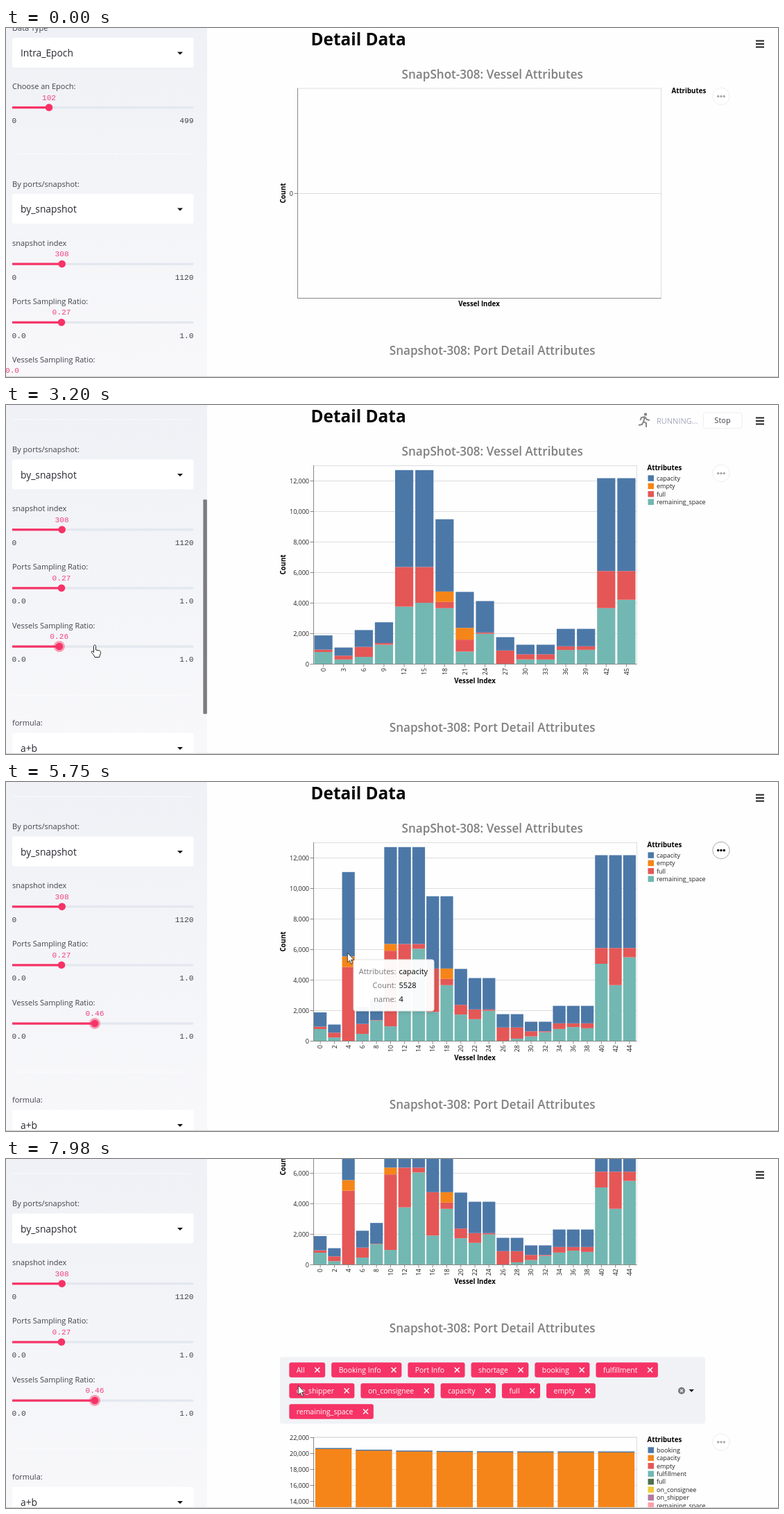
An HTML page for the animation above (8 s loop, 1113 by 503 pixels).

```html
<!DOCTYPE html>
<html lang="en">
<head>
<meta charset="utf-8">
<title>Detail Data</title>
<style>
html, body { margin: 0; width: 100%; height: 100%; overflow: hidden; background: #fff; }
svg { display: block; width: 100%; height: 100%; }
text { font-family: "Open Sans", "Noto Sans", sans-serif; font-size: 11px; fill: #41424b; white-space: pre; }
.mono { font-family: "Liberation Mono", "Noto Sans Mono", monospace; font-size: 11.2px; }
.val { fill: #f0447a; }
.pick { font-size: 13.8px; fill: #262730; }
.h1 { font-size: 24.4px; font-weight: 700; fill: #050505; }
.h2 { font-size: 17.1px; font-weight: 600; fill: #808080; }
.ax { font-size: 9px; fill: #222; }
.axt { font-size: 9.7px; font-weight: 700; fill: #000; }
.tag { font-size: 10.4px; fill: #fff; }
.key { fill: #777; }
.fact { fill: #000; }
.soft { fill: #a3a8b8; }
</style>
</head>
<body>
<svg id="stage" viewBox="0 0 1113 503" xmlns="http://www.w3.org/2000/svg"></svg>
<script>
const PINK = '#f63366', BLUE = '#4c78a8', ORANGE = '#f58518', RED = '#e45756', TEAL = '#72b7b2';
const LOOP = 8000, PLOT = 443, SPAN = 466;

// ship classes: first vessel index -> capacity
const classes = {
  0: 930, 2: 533, 4: 5528, 6: 1105, 8: 1360, 10: 6345, 16: 4735,
  20: 2355, 22: 2055, 26: 873, 30: 625, 34: 1145, 40: 6080
};
// percent of free space, one per sampled vessel; percent of empty containers where there are any
const free = [83, 41, 53, 0, 41, 98, 92, 15, 59, 95, 63, 40, 77, 73, 34, 69, 96, 0, 0, 16, 46, 90, 45,
  68, 79, 72, 80, 83, 60, 90, 69];
const empties = { 4: 12.6, 10: 7, 18: 14.4, 21: 32.7 };

const capacityOf = k => classes[Math.max(...Object.keys(classes).filter(c => c <= k))];
const vessels = [...Array(46).keys()].filter(k => k % 2 === 0 || k % 3 === 0).map((k, i) => {
  const cap = capacityOf(k), rem = cap * free[i] / 100, empty = cap * (empties[k] || 0) / 100;
  return { k, cap, rem, empty, full: cap - rem - empty };
});

const text = (x, y, s, cls = '', anchor = 'start', extra = '') =>
  `<text x="${x}" y="${y}" class="${cls}" text-anchor="${anchor}" ${extra}>${s}</text>`;
const rect = (x, y, w, h, fill, extra = '') =>
  `<rect x="${x}" y="${y}" width="${w}" height="${h}" fill="${fill}" ${extra}/>`;
const path = (d, stroke, extra = 'fill="none"') => `<path d="${d}" stroke="${stroke}" ${extra}/>`;
const group = (id, body, extra = '') => `<g id="${id}" ${extra}>${body}</g>`;
const vertical = (x, y, s, cls, anchor) => text(x, y, s, cls, anchor, `transform="rotate(-90 ${x} ${y})"`);
const thousands = (from, to) => Array.from({ length: (to - from) / 2 + 1 }, (_, i) => (from + i * 2) * 1000);

const pen = document.createElement('canvas').getContext('2d');
pen.font = '10.4px "Open Sans", "Noto Sans", sans-serif';

function select(y, label, value) {
  return text(9, y - 10.3, label) + rect(9, y, 261.5, 43, '#fff', 'rx="3"') +
    text(21, y + 27, value, 'pick') + `<path d="M247 ${y + 20.5}h8l-4 4z" fill="#111"/>`;
}

function slider(y, label, value, x, min, max, id = '') {
  return text(9, y - 26.3, label) +
    text(x, y - 11, value, 'mono val', 'middle', id && `id="${id}Text"`) +
    rect(9, y - 1.5, 261.5, 3.2, '#e3e7ef', 'rx="1.5"') +
    rect(9, y - 1.5, x - 9, 3.2, PINK, id && `id="${id}Fill"`) +
    (id && `<circle id="${id}Halo" cx="${x}" cy="${y}" r="8" fill="${PINK}" opacity=".45"/>`) +
    `<circle cx="${x}" cy="${y}" r="5.3" fill="${PINK}" ${id && `id="${id}Thumb"`}/>` +
    text(8.5, y + 22.5, min, 'mono') + text(270.5, y + 22.5, max, 'mono', 'end');
}

function legend(x, y, items) {
  return text(x, y, 'Attributes', 'axt') + items.map(([name, color], i) => {
    const cy = y + 11.5 + i * 11.4;
    return rect(x + 1, cy - 4.2, 8.5, 8.5, color) + text(x + 13.5, cy + 3.2, name, 'ax');
  }).join('');
}

function frame(x, y, w, h, ticks, yOf) {
  return rect(x + .5, y + .5, w, h, 'none', 'stroke="#ddd"') + ticks.map(v => {
    const ty = Math.round(yOf(v)) + .5;
    return path(`M${x} ${ty}h${w}`, '#ddd') + path(`M${x - 4.5} ${ty}h4.5`, '#888') +
      text(x - 6, ty + 3.2, v.toLocaleString('en-US'), 'ax', 'end');
  }).join('');
}

const axes = (x, y, w, h) => path(`M${x + .5} ${y}v${h + .5}h${w}`, '#888');

const axisTitles = (x, y) => vertical(402.7, y, 'Count', 'axt', 'middle') +
  text(x, 400.5, 'Vessel Index', 'axt', 'middle');

function vesselChart(id, step) {
  const yOf = v => 373 - v * .022, shown = vessels.filter(v => v.k % step === 0);
  const band = SPAN / shown.length;
  let s = frame(PLOT, 87, SPAN, 286, thousands(0, 12), yOf);
  shown.forEach(({ k, cap, rem, empty, full }, i) => {
    let sum = 0;
    [[rem, TEAL], [full, RED], [empty, ORANGE], [cap, BLUE]].forEach(([n, color]) => {
      sum += n;
      s += rect(PLOT + band * (i + .05), yOf(sum), band * .9, n * .022, color);
    });
    const cx = PLOT + band * (i + .5);
    s += path(`M${cx} 373v4.5`, '#888') + vertical(cx + 3.2, 379, k, 'ax', 'end');
  });
  return group(id, s + axes(PLOT, 87, SPAN, 286) + axisTitles(676, 230) +
    legend(924.5, 94, [['capacity', BLUE], ['empty', ORANGE], ['full', RED], ['remaining_space', TEAL]]));
}

function emptyChart() {
  return group('chart0', frame(420, 86.5, 524, 302.5, [0], () => 238) + axes(420, 87, 524, 302) +
    axisTitles(682, 238) + text(959.5, 94, 'Attributes', 'axt'));
}

function portChart() {
  const top = 622, count = 8, band = SPAN / count;
  let s = frame(PLOT, top - .5, SPAN, 260, thousands(14, 22), v => top + (22000 - v) * .01155);
  for (let i = 0; i < count; i++) {
    const x = PLOT + band * (i + .05), y = top + 22 - 5 * Math.exp(-i / 1.5);
    s += rect(x, y - 1.5, band * .9, 2, BLUE) + rect(x, y, band * .9, 200, ORANGE);
  }
  return s + path(`M${PLOT + .5} ${top}v260`, '#888') + legend(924.5, 629, [
    ['booking', BLUE], ['capacity', ORANGE], ['empty', RED], ['fulfillment', TEAL], ['full', '#4f7050'],
    ['on_consignee', '#eeca3b'], ['on_shipper', '#b279a2'], ['remaining_space', '#ff9da6']]);
}

function tags() {
  const names = ['All', 'Booking Info', 'Port Info', 'shortage', 'booking', 'fulfillment', 'on_shipper',
    'on_consignee', 'capacity', 'full', 'empty', 'remaining_space'];
  let s = rect(395, 506.5, 613, 96, '#f0f2f6', 'rx="3"'), x = 408.3, y = 525;
  for (const name of names) {
    const w = pen.measureText(name).width + 40;
    if (x + w > 960) { x = 408.3; y += 30; }
    s += rect(x, y - 10.8, w, 21.6, PINK, 'rx="3"') + text(x + 10.5, y + 3.6, name, 'tag') +
      path(`M${x + w - 14.8} ${y - 3.5}l7 7m0-7l-7 7`, '#fff', 'stroke-width="1.5"');
    x += w + 9;
  }
  return s + '<circle cx="974" cy="555" r="5" fill="#777"/>' +
    path('M972 553l4 4m0-4l-4 4', '#f0f2f6', 'stroke-width="1.2"') +
    '<path d="M984.5 553h7.5l-3.7 4z" fill="#222"/>';
}

const menuDots = (id, y) => group(id,
  `<circle cx="1031" cy="${y}" r="12.2" fill="#fff" stroke="#eee"/>` +
  [-4.3, 0, 4.3].map(d => `<circle cx="${1031 + d}" cy="${y}" r="1.7"/>`).join(''), 'fill="#aaa"');

const runner = group('runner', '<circle cx="922" cy="13.5" r="2.2" fill="#888" stroke="none"/>' +
  path('M921 17l-2 7l4 2v6M919 24l-2 4l-5 1M921 17l-5 1l-1.5 4M921 17l3 4l4 1', '#888'),
  'fill="none" stroke-width="2"');
const bike = group('bike', '<circle cx="914" cy="26" r="4.4"/><circle cx="927" cy="26" r="4.4"/>' +
  '<circle cx="922.5" cy="13.5" r="1.9" fill="#888"/>' + path('M921 27v-4l-4-3l5-4l3 4h4', '#888'),
  'fill="none" stroke="#888" stroke-width="1.6"');
const rule = y => rect(9, y, 257, 1, '#fff', 'opacity=".55"');

const stage = document.getElementById('stage');
stage.innerHTML = `
<defs>
  <linearGradient id="shade" x2="0" y2="1"><stop stop-color="#eff1f6"/><stop offset="1" stop-color="#f8f8fa"/></linearGradient>
  <clipPath id="sideClip"><rect width="290" height="503"/></clipPath>
  <filter id="drop" x="-10%" y="-10%" width="125%" height="130%"><feDropShadow dx="2" dy="2" stdDeviation="2" flood-opacity=".12"/></filter>
</defs>` +
  rect(0, 0, 1113, 503, '#fefefe') +
  group('main',
    text(439.5, 24.5, 'Detail Data', 'h1') +
    text(701.2, 72.5, 'SnapShot-308: Vessel Attributes', 'h2', 'middle') +
    emptyChart() + vesselChart('chart1', 3) + vesselChart('chart2', 2) + menuDots('dots', 98.5) +
    text(701.2, 471, 'Snapshot-308: Port Detail Attributes', 'h2', 'middle') +
    tags() + portChart() + menuDots('dots2', 629)) +
  group('running', runner + bike + text(938, 27, 'RUNNING...', 'soft') +
    rect(1005.5, 11, 55.5, 22.5, '#fff', 'rx="3" stroke="#eee"') +
    text(1033, 26.3, 'Stop', '', 'middle')) +
  path('M1081 18.5h12M1081 23h12M1081 27.5h12', '#222', 'stroke-width="1.8"') +
  '<g clip-path="url(#sideClip)">' + rect(0, 0, 290, 503, 'url(#shade)') +
  group('side',
    select(14, 'Data Type', 'Intra_Epoch') +
    slider(114.5, 'Choose an Epoch:', '102', 62, '0', '499') + rule(181) +
    select(239, 'By ports/snapshot:', 'by_snapshot') +
    slider(340, 'snapshot index', '308', 80.7, '0', '1120') +
    slider(424.2, 'Ports Sampling Ratio:', '0.27', 80, '0.0', '1.0') +
    slider(508.4, 'Vessels Sampling Ratio:', '0.0', 9, '0.0', '1.0', 'ratio') + rule(578) +
    select(633, 'formula:', 'a+b')) +
  rect(284.3, 43, 5.5, 309, '#7c7c7e', 'id="bar" rx="1"') + '</g>' +
  rect(0, 501.8, 1113, 1.2, '#d2d2d4') +
  group('tip', rect(0, 0, 116, 74, '#fff', 'id="tipBox" rx="3" fill-opacity=".95" stroke="#e4e4e4" filter="url(#drop)"') +
    ['Attributes:', 'Count:', 'name:'].map((k, i) =>
      text(61.5, 21 + i * 20, k, 'key', 'end') +
      text(65.5, 21 + i * 20, '4', 'fact', 'start', `id="tip${i}"`)).join('')) +
  group('arrow', path('M.3 .3V14L3.4 11.2L5.6 16.2L7.7 15.3L5.5 10.4H9.8Z', '#333', 'fill="#fff" stroke-width=".9"')) +
  group('hand', path('M-1.5 1.5c0-2 3-2 3 0V7l5 1c1.5.3 2 1 2 2.5 0 3-1.5 4-1.8 7H0C-.5 15-3.5 12-4.7 10.5c-.8-1.2.6-2.2 1.8-1.2l1.4 1.2Z',
    '#222', 'fill="#fff" stroke-width="1"'));

const $ = id => document.getElementById(id);
const show = (id, on) => { $(id).style.display = on ? '' : 'none'; };
const move = (id, x, y) => $(id).setAttribute('transform', `translate(${x} ${y})`);
const during = (t, a, b) => t >= a && t < b;

// each move: start, end, then the values reached; eases out and rests in between
function glide(values, moves, t) {
  for (const [a, b, ...goal] of moves) {
    if (t <= a) break;
    const p = 1 - (1 - Math.min(1, (t - a) / (b - a))) ** 2;
    values = values.map((v, i) => v + (goal[i] - v) * p);
  }
  return values;
}

const pointer = t => glide([564, 427], [
  [130, 620, 25, 405], [1640, 2100, 77, 349], [3100, 3200, 128, 346], [3700, 4290, 462, 286],
  [4480, 4830, 497, 285], [5000, 5120, 497, 241], [5290, 5520, 492, 246], [5830, 6060, 488, 213],
  [6600, 6830, 471, 223], [6980, 7750, 421, 326]], t);
const sideScroll = t => glide([0], [[770, 1250, 79], [1410, 1720, 160.4]], t)[0];
const mainScroll = t => glide([0], [[7750, 7960, 221]], t)[0];

function setRatio(t) {
  const [label, x] = t < 2330 ? ['0.0', 9] : t < 3590 ? ['0.26', 76.8] : ['0.46', 128];
  $('ratioText').textContent = label;
  $('ratioText').setAttribute('x', x);
  $('ratioFill').setAttribute('width', x - 9);
  $('ratioThumb').setAttribute('cx', x);
  $('ratioHalo').setAttribute('cx', x);
  show('ratioHalo', t >= 2330);
}

// the only bar the pointer visits is vessel 4
function setTip(x, y, t) {
  const on = during(t, 4480, 7000) && x > 484.5 && x < 502.7;
  show('tip', on);
  if (!on) return;
  const [name, n, w] = y < 251.4 ? ['capacity', 5528, 116] : y < 266.7 ? ['empty', 696, 108] : ['full', 4832, 100];
  move('tip', x + 9, y + 10);
  $('tipBox').setAttribute('width', w);
  $('tip0').textContent = name;
  $('tip1').textContent = n;
}

function draw(t) {
  const [x, y] = pointer(t), side = sideScroll(t), main = mainScroll(t);
  const visible = t >= 130, hand = during(t, 2050, 3780);
  move('side', 0, -side);
  move('main', 0, -main);
  $('bar').setAttribute('y', 43 + side * .581);
  show('bar', visible && x < 290);
  setRatio(t);
  show('chart0', t < 3200);
  show('chart1', during(t, 3200, 4210));
  show('chart2', t >= 4210);
  const over = visible && x > 395 && y + main < 405;
  $('dots').setAttribute('fill', over ? '#000' : '#aaa');
  $('dots').firstChild.setAttribute('stroke', over ? '#aaa' : '#eee');
  show('running', during(t, 2410, 3340) || during(t, 3670, 4740));
  const odd = Math.floor(t / 150) % 2 === 1;
  show('runner', odd);
  show('bike', !odd);
  setTip(x, y, t);
  show('arrow', visible && !hand);
  show('hand', hand);
  move('arrow', x, y);
  move('hand', x, y);
}

const start = performance.now();
function tick() {
  draw((performance.now() - start) % LOOP);
  requestAnimationFrame(tick);
}
tick();
</script>
</body>
</html>
```
